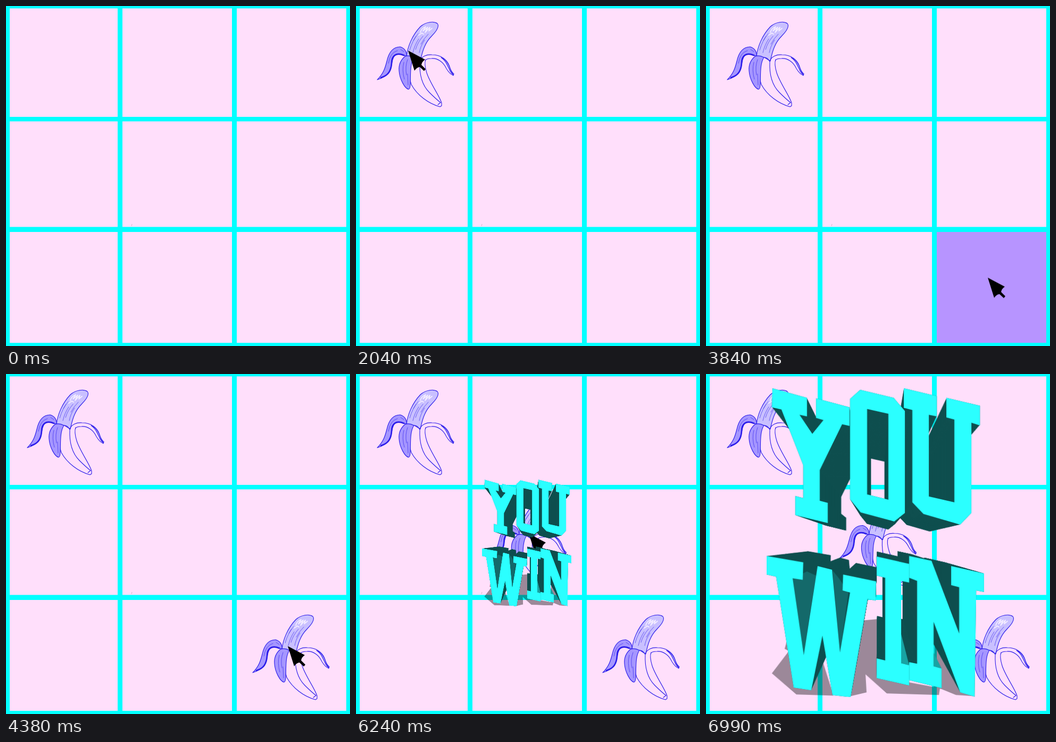
An HTML page without scripts that plays this animation: 647x641 px, repeating every 7.02 s.

```html
<!DOCTYPE html>
<html lang="en">
<head>
<meta charset="utf-8">
<title>Three in a row</title>
<style>
html, body { margin: 0; width: 100%; height: 100%; overflow: hidden; background: #0ff; }
svg { display: block; width: 647px; height: 641px; }

.cells { fill: #ffdffb; }
.ink { fill: none; stroke: #2a1bea; stroke-width: 1.1; stroke-linejoin: round; stroke-linecap: round; }
.hit { fill: #b794ff; opacity: 0; animation: hit 7.02s linear infinite; }
.fruit { animation: 7.02s step-end infinite; }
.cursor { animation: move 7.02s linear infinite; }
.win { transform-origin: 323px 319px; animation: grow 7.02s linear infinite; }

@keyframes hit {
  0%, 4.4% { opacity: 1; }
  5.1%, 100% { opacity: 0; }
}
@keyframes first { 0% { opacity: 0; } 26.5%, 100% { opacity: 1; } }
@keyframes second { 0% { opacity: 0; } 57.26%, 100% { opacity: 1; } }
@keyframes third { 0% { opacity: 0; } 80.34%, 100% { opacity: 1; } }
@keyframes move {
  0%, 1.28% { transform: translate(660px, 552px); }
  1.71% { transform: translate(643px, 538px); }
  11.54% { transform: translate(381px, 321px); }
  21.79% { transform: translate(109px, 93px); }
  22.65% { transform: translate(98px, 84px); }
  30.01% { transform: translate(98px, 84px); animation-timing-function: cubic-bezier(.37, 0, .63, 1); }
  50.67% { transform: translate(540px, 531px); }
  52.99% { transform: translate(530px, 512px); }
  62.68% { transform: translate(530px, 513px); animation-timing-function: cubic-bezier(.37, 0, .63, 1); }
  76.07%, 81.2% { transform: translate(309px, 303px); }
  88.89% { transform: translate(325px, 301px); }
  95.44%, 100% { transform: translate(345px, 235px); }
}
@keyframes grow {
  0%, 81.48% { transform: scale(0); }
  100% { transform: scale(1.0236); }
}
</style>
</head>
<body>
<svg viewBox="0 0 647 641">
  <defs>
    <g id="banana" class="ink">
      <path fill="#c9c0ff" d="M95 95C97 76 106 55 121 39C131 30 146 28 153 33C157 38 152 47 142 57C130 69 125 84 121 104L110 97Z"/>
      <path stroke-width=".6" d="M101 83Q106 65 117 52M107 88Q110 74 118 62M112 82Q116 68 126 57M119 88Q121 76 129 64M122 72Q127 62 136 53M108 65L113 57"/>
      <path stroke="#f4edff" stroke-width="1.8" d="M121 50Q123 42 131 39L126 47L135 40L130 50L139 40L137 47L143 42M118 55L124 51L127 53"/>
      <path fill="#a596ff" d="M40 139C52 127 55 116 58 104C62 86 71 77 83 77C91 79 96 86 95 95C83 88 72 89 69 101C65 119 64 132 40 139Z"/>
      <path stroke-width="2.6" d="M90 93C76 87 67 93 67 108C66 122 61 131 47 135"/>
      <path stroke-width=".6" d="M61 108Q64 88 78 84M84 82L90 86"/>
      <path d="M107 97C101 113 99 134 104 148C115 168 136 184 158 190L161 188L161 183C158 171 139 145 133 126C129 113 129 106 131 101M120 105C119 127 124 149 138 163Q150 175 159 182L154 186M110 97Q116 97 120 105"/>
      <path fill="#a596ff" d="M92 95Q100 92 109 97C101 108 103 133 102 147Q102 156 99 157C92 156 82 138 81 122C80 110 85 101 92 95Z"/>
      <path stroke-width=".6" d="M90 106Q86 121 91 138M97 101Q92 114 95 130M97 128L98 149"/>
      <path d="M120 104C123 95 133 91 143 92C160 92 171 101 175 112Q178 123 184 128L183 131Q176 128 170 118C164 105 153 98 142 99Q133 99 131 102"/>
      <path fill="#b9adff" d="M160 97C170 104 171 111 175 118Q178 126 183 130Q178 122 175 112Q170 101 160 97Z"/>
    </g>

    <g id="letters">
      <path d="M125 27L190 45V80L176 77L200 113L221 87L207 83V46L270 63V98L256 95L214 181V239L229 243V281L168 266V230L183 234V172L142 67L124 63Z"/>
      <path fill-rule="evenodd" d="M290 30L353 45L374 70V262L354 278L291 261L271 236V47ZM303 66V227L343 237V75Z"/>
      <path d="M372 27L434 42V80L419 77V231L467 242V86L452 82V45L515 60V97L499 92V262L478 284L409 264L388 242V68L372 64Z"/>
      <path d="M114 343L183 355L182 388L163 385L184 530L210 362L237 369L252 525L271 412L257 408L258 378L320 391L319 427L304 424L272 609L238 605L219 493L198 596L165 591L132 382L114 378Z"/>
      <path d="M321 344L382 358V393L367 390V545L382 549V587L321 573V536L337 540V384L321 380Z"/>
      <path d="M382 343L424 352L476 489V402L461 398V362L523 376V411L508 408L505 608L478 600L428 467V551L443 555V592L382 577V543L397 546V390L382 384Z"/>
    </g>

    <!-- each level doubles the depth of the sweep -->
    <use id="d0" href="#letters" transform="translate(-323 -319)"/>
    <g id="d1"><use href="#d0" transform="scale(.9927)"/><use href="#d0"/></g>
    <g id="d2"><use href="#d1" transform="scale(.98545)"/><use href="#d1"/></g>
    <g id="d3"><use href="#d2" transform="scale(.97112)"/><use href="#d2"/></g>
    <g id="d4"><use href="#d3" transform="scale(.94307)"/><use href="#d3"/></g>
    <g id="d5"><use href="#d4" transform="scale(.88938)"/><use href="#d4"/></g>
    <g id="d6"><use href="#d5" transform="scale(.791)"/><use href="#d5"/></g>
  </defs>

  <rect width="647" height="641" fill="#0ff"/>
  <path class="cells" d="M7 4.5H210V209H7ZM219 4.5H425V209H219ZM434 4.5H640V209H434ZM7 217.5H210V416.5H7ZM219 217.5H425V416.5H219ZM434 217.5H640V416.5H434ZM7 426H210V635H7ZM219 426H425V635H219ZM434 426H640V635H434Z"/>
  <path d="M237 411L236 415" stroke="#c5adc3" stroke-width=".8"/>

  <g class="fruit" style="animation-name:first"><use href="#banana"/></g>
  <g class="fruit" style="animation-name:second"><use href="#banana" x="424" y="424"/></g>
  <g class="fruit" style="animation-name:third"><use href="#banana" x="211.5" y="208.5"/></g>

  <rect class="hit" x="8" y="5" width="202" height="204" style="animation-delay:1.56s"/>
  <rect class="hit" x="434" y="426" width="206" height="209" style="animation-delay:3.72s"/>
  <rect class="hit" x="219.5" y="218" width="205.5" height="198.500" style="animation-delay:5.34s"/>

  <path class="cursor" d="M0 0L32 17Q26 21 25 27L33 35L30 38.500L22 31Q17 31 12 38Z"/>

  <g class="win">
    <path opacity=".39" d="M153 500L148 518L156 522L124 564L170 604L240 606L200 480ZM290 465L322 462V570L440 592L438 605L340 602L300 566L302 600L272 607L250 520ZM430 500L476 560L505 607L470 605L443 594L428 590Z"/>
    <use href="#d6" transform="translate(323 319)" fill="#0f4f4f"/>
    <path fill="#14696a" d="M163 385L184 530L207 380L190 372ZM237 369L252 525L268 412L250 385Z"/>
    <path fill="#18a3a3" d="M367 545L382 549L367 490ZM428 551L443 555L428 525Z"/>
    <use href="#letters" fill="#2bffff"/>
  </g>
</svg>
</body>
</html>
```
